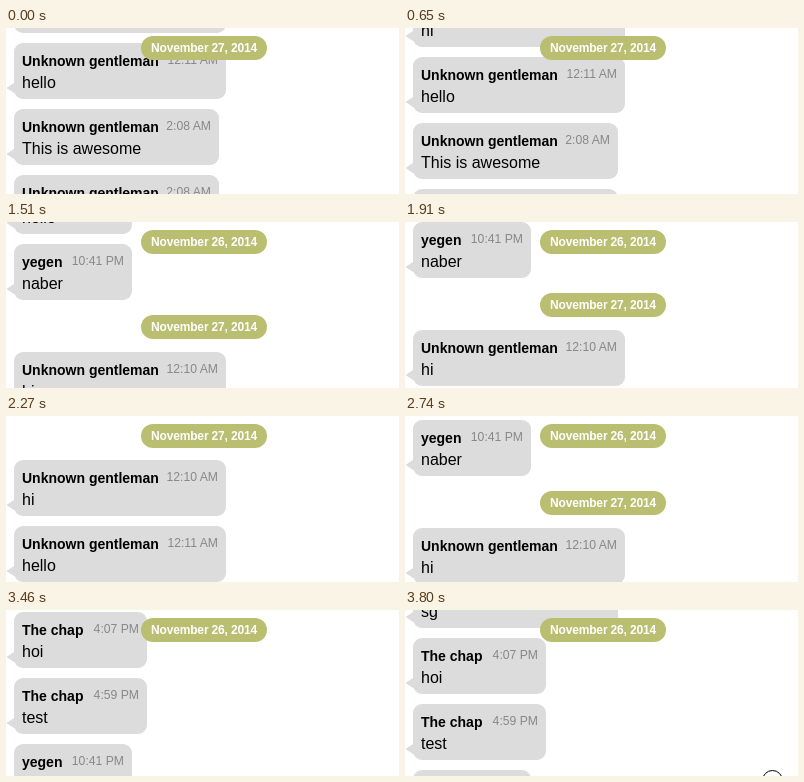
An HTML page that plays this animation: 393x166 px, repeating every 3.9 s.

```html
<!DOCTYPE html>
<html lang="en">
<head>
<meta charset="utf-8">
<title>Chat with sticky dates</title>
<style>
  html, body { margin: 0; width: 100%; height: 100%; overflow: hidden; background: #fff; }
  svg { display: block; width: 393px; height: 166px; font-family: "Liberation Sans", Arial, sans-serif; }
  .bubble { fill: #dcdcdc; }
  .name { font-size: 14px; font-weight: bold; }
  .time { font-size: 12.2px; fill: #888; text-anchor: end; }
  .body { font-size: 16px; }
  .pill { fill: #babe70; }
  .date { font-size: 12px; font-weight: bold; letter-spacing: -0.16px; fill: #fff; text-anchor: middle; }
  .cursor { fill: #fff; stroke: #000; }
</style>
</head>
<body>
<svg id="stage" viewBox="0 0 393 166"></svg>
<script>
const LOOP = 3900;
const STICKY_TOP = 8;
const PILL_GAP = 42;
const ROW = 66;

const ANON = "Unknown gentleman", KIN = "yegen", CHAP = "The chap";

// y is relative to the first message of November 27
const messages = [
  [-108 - 4 * ROW, ANON, "3:52 PM", "sg", 205],
  [-108 - 3 * ROW, CHAP, "4:07 PM", "hoi", 133],
  [-108 - 2 * ROW, CHAP, "4:59 PM", "test", 133],
  [-108 - ROW, KIN, "10:41 PM", "hello", 118],
  [-108, KIN, "10:41 PM", "naber", 118],
  [0, ANON, "12:10 AM", "hi", 212],
  [ROW, ANON, "12:11 AM", "hello", 212],
  [2 * ROW, ANON, "2:08 AM", "This is awesome", 205],
  [3 * ROW, ANON, "2:08 AM", "hey", 205]
];

// scroll position over time: [ms, y]
const keys = [
  [550, -51], [990, 64], [1510, 130], [1600, 134], [2270, 44],
  [2330, 42], [2740, 112], [3100, 258], [3800, 334]
];

// bursts of screen updates: [first, last, count]
const bursts = [
  [600, 1100, 10], [1160, 1680, 10], [1740, 2210, 9],
  [2270, 2740, 9], [2800, 3280, 9], [3340, 3800, 9]
];

const stage = document.getElementById("stage");

function add(parent, tag, attrs, text) {
  const el = document.createElementNS("http://www.w3.org/2000/svg", tag);
  for (const key in attrs) el.setAttribute(key, attrs[key]);
  if (text) el.textContent = text;
  parent.appendChild(el);
  return el;
}

function addMessage(list, [y, name, time, body, width]) {
  const g = add(list, "g", { transform: `translate(0 ${y})` });
  add(g, "rect", { class: "bubble", x: 8, width, height: 56, rx: 9 });
  add(g, "path", { class: "bubble", d: "M0.5 45L8 40H9V50H8Z" });
  add(g, "text", { class: "name", x: 16, y: 23 }, name);
  add(g, "text", { class: "time", x: width, y: 21 }, time);
  add(g, "text", { class: "body", x: 16, y: 45 }, body);
}

function addPill(label) {
  const g = add(stage, "g", {});
  add(g, "rect", { class: "pill", x: 135, width: 126, height: 24, rx: 12 });
  add(g, "text", { class: "date", x: 198, y: 16 }, label);
  return g;
}

const moveTo = (el, y) => el.setAttribute("transform", `translate(0 ${y})`);
const slope = i => (keys[i + 1][1] - keys[i][1]) / (keys[i + 1][0] - keys[i][0]);

// monotone tangent: flat at turning points, harmonic mean elsewhere
function tangent(i) {
  if (i === 0) return slope(0);
  if (i === keys.length - 1) return slope(i - 1) * 0.4;
  const a = slope(i - 1), b = slope(i);
  return a * b <= 0 ? 0 : 2 * a * b / (a + b);
}

function scrollAt(t) {
  if (t <= keys[0][0]) return keys[0][1];
  const i = Math.max(0, keys.findIndex(k => t <= k[0]) - 1);
  const [t0, y0] = keys[i], [t1, y1] = keys[i + 1];
  const d = t1 - t0, u = (t - t0) / d, v = 1 - u;
  return v * v * (1 + 2 * u) * y0 + u * u * (1 + 2 * v) * y1
    + d * u * v * (v * tangent(i) - u * tangent(i + 1));
}

function snap(t) {
  const burst = bursts.filter(b => b[0] <= t).pop();
  if (!burst) return 0;
  const [first, last, count] = burst;
  const step = (last - first) / (count - 1);
  return first + step * Math.min(count - 1, Math.floor((t - first) / step + 0.05));
}

const list = add(stage, "g", {});
messages.forEach(m => addMessage(list, m));
const earlier = addPill("November 26, 2014");
const later = addPill("November 27, 2014");
const cursor = add(stage, "circle", { class: "cursor", cx: 367.5, cy: 170.5, r: 10 });

function draw() {
  const t = snap(performance.now() % LOOP);
  const y = Math.round(scrollAt(t));
  const laterY = Math.max(STICKY_TOP, y - 37);
  moveTo(list, y);
  moveTo(later, laterY);
  moveTo(earlier, Math.min(STICKY_TOP, laterY - PILL_GAP));
  cursor.setAttribute("visibility", t >= 3800 ? "visible" : "hidden");
  requestAnimationFrame(draw);
}
draw();
</script>
</body>
</html>
```
